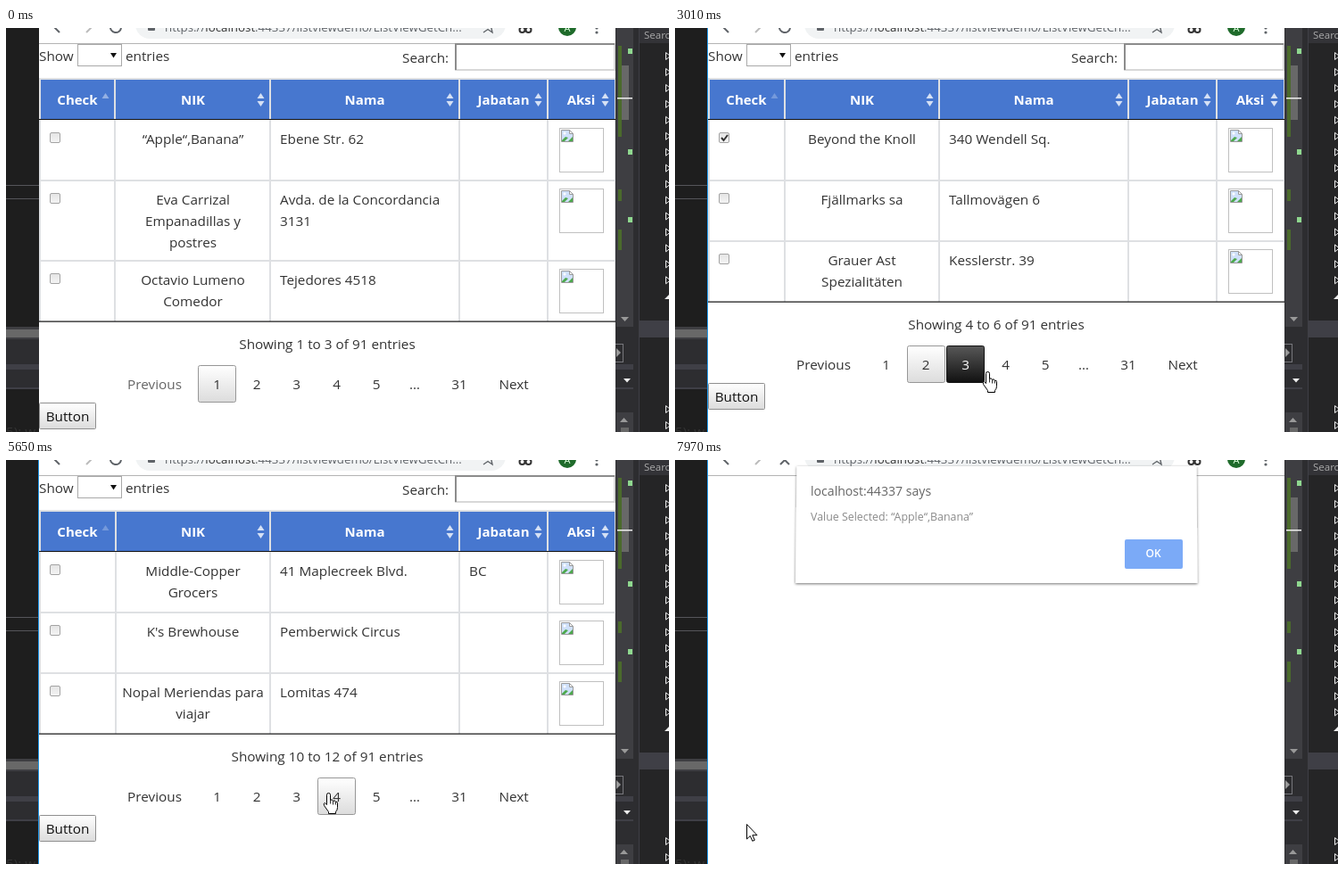
Recreate the animation shown at these times as an HTML page. Size 743 px wide and 453 px high, loop 8 s.

```html
<!DOCTYPE html>
<html lang="en">
<head>
<meta charset="utf-8">
<title>Paged table</title>
<style>
html, body { margin: 0; width: 100%; height: 100%; overflow: hidden; background: #1e1e1e; }
svg { display: block; }
text { font: 15.3px "Open Sans", "Noto Sans", sans-serif; fill: #333; white-space: pre; }
.mid { text-anchor: middle; }
.head { font-weight: 700; font-size: 15px; fill: #fff; }
</style>
</head>
<body>
<svg width="743" height="453" viewBox="0 0 743 453">
  <defs>
    <linearGradient id="light" x2="0" y2="1"><stop stop-color="#fff"/><stop offset="1" stop-color="#dcdcdc"/></linearGradient>
    <linearGradient id="hover" x2="0" y2="1"><stop stop-color="#585858"/><stop offset="1" stop-color="#111"/></linearGradient>
    <linearGradient id="down" x2="0" y2="1"><stop stop-color="#2b2b2b"/><stop offset="1" stop-color="#0c0c0c"/></linearGradient>
    <linearGradient id="box" x2="0" y2="1"><stop stop-color="#e4e4e4"/><stop offset="1" stop-color="#f4f4f4"/></linearGradient>
    <filter id="shade" x="-5%" y="-10%" width="110%" height="125%"><feDropShadow dx="0" dy="1" stdDeviation="1.6" flood-opacity=".55"/></filter>
  </defs>
  <g id="editor"></g>
  <g id="view"></g>
  <g id="cursor"></g>
</svg>
<script>
const $ = id => document.getElementById(id);
const rect = (x, y, w, h, fill, more = '') => `<rect x="${x}" y="${y}" width="${w}" height="${h}" fill="${fill}" ${more}/>`;
const path = (d, fill, more = '') => `<path d="${d}" fill="${fill}" ${more}/>`;
const line = (d, color, width = 1) => path(d, 'none', `stroke="${color}" stroke-width="${width}"`);
const text = (x, y, s, cls = '', style = '') => `<text x="${x}" y="${y}" class="${cls}" style="${style}">${s}</text>`;
const frame = (x, y, w, h, fill, stroke, r = 0) =>
  rect(x + .5, y + .5, w - 1, h - 1, fill, `stroke="${stroke}" rx="${r}"`);

// Each row: name lines, address lines, third column
const pages = [
  [['“Apple“,Banana”', 'Ebene Str. 62'],
   ['Eva Carrizal|Empanadillas y|postres', 'Avda. de la Concordancia|3131'],
   ['Octavio Lumeno|Comedor', 'Tejedores 4518']],
  [['Beyond the Knoll', '340 Wendell Sq.'],
   ['Fjällmarks sa', 'Tallmovägen 6'],
   ['Grauer Ast|Spezialitäten', 'Kesslerstr. 39']],
  [['Marnouddsl mère et|fille', '36, place Vélmar'],
   ['Vívido Cocina|preparada', 'C/ Oropín, 52'],
   ["Bel plat'", '15, rue des Plumières']],
  [['Middle-Copper|Grocers', '41 Maplecreek Blvd.', 'BC'],
   ["K's Brewhouse", 'Pemberwick Circus'],
   ['Nopal Meriendas para|viajar', 'Lomitas 474']]
];
const turns = [1860, 3470, 5570];            // page changes
const checks = [790, 2560, 4710, 6810];      // first box ticked on each page
const presses = [1780, 3390, 5490];          // pager button held for 80 ms
const pager = [['Previous', 166.5], ['1', 236.5], ['2', 281], ['3', 325.5], ['4', 370.5],
  ['5', 415], ['…', 458], ['31', 508], ['Next', 569]];

// time, x, y of the pointer tip
const moves = [[70, 150, 470], [500, 64, 142], [640, 54, 123], [940, 54, 123], [1100, 240, 294],
  [1280, 322, 393], [1450, 326, 396], [1700, 289, 396], [1860, 289, 396], [2160, 66, 127],
  [2330, 66, 127], [2390, 56, 124], [2600, 56, 124], [3010, 350, 385], [3160, 350, 385],
  [3240, 346, 385], [3500, 346, 385], [4100, 76, 127], [4250, 76, 127], [4330, 63, 125],
  [4480, 63, 125], [4560, 52, 125], [4850, 52, 125], [5030, 322, 342], [5270, 361, 373],
  [5680, 361, 373], [6110, 46, 129], [6340, 46, 129], [6500, 53, 126], [7000, 53, 126],
  [7560, 82, 404], [7820, 80, 408]];

const shapes = {
  arrow: path('M0 0V16.5L3.8 13 6.3 18.8 8.8 17.7 6.3 12.2H11.5Z', '#fff', 'stroke="#000"'),
  beam: line('M-3 -7H-1L0 -6 1 -7H3M0 -6V6M-3 7H-1L0 6 1 7H3', '#222', 1.2),
  hand: path('M-2 13V2Q-2 0 0 0T2 2V8Q4 6 5 9 7 7 8 10 10 9 10 11V16Q10 19 8 21V23H0V21L-5 14Q-6 11 -4 11Z',
    '#fff', 'stroke="#000"') + line('M2 8V12M5 9V13M8 10V13', '#000', .8)
};

function drawEditor() {
  const side = '#2d2d30', edge = '#3f3f46', grip = '#686868', pale = '#999';
  let s = rect(0, 176, 37, 1, '#55555a') + rect(0, 191, 37, 1, '#55555a') + rect(0, 335, 37, 14, '#3e3e42')
    + rect(0, 338, 37, 9, grip) + rect(0, 349, 37, 28, side) + rect(0, 377, 37, 6, edge)
    + rect(0, 383, 37, 20, side) + rect(0, 403, 37, 2, edge)
    + text(0, 458, '5): w', '', 'font:12px "DejaVu Sans Mono",monospace;fill:#ddd');
  s += rect(683, 0, 26, 453, side) + rect(684, 0, 19, 335, '#3e3e42') + rect(690, 42, 8, 61, grip);
  for (const [y, h] of [[20, 102], [181, 13], [226, 23]]) s += rect(686, y, 4, h, '#4b6a2c');
  for (const y of [23, 136, 212]) s += rect(697, y, 5, 6, '#8fd88f');
  s += rect(685, 78, 17, 1.5, '#eee') + path('M689 324h9l-4.500 5z', pale)
    + frame(676, 354, 16, 21, side, '#77777c') + path('M684 359v10l5-5z', pale)
    + rect(683, 377, 20, 6, edge) + path('M692 393h8l-4 4.500z', '#eee')
    + rect(683, 403, 20, 2, edge) + rect(684, 431, 19, 22, '#3e3e42')
    + path('M688 442h9l-4.500-5z', pale) + rect(689, 448, 9, 5, grip);
  s += rect(709, 0, 34, 453, '#252526') + rect(709, 0, 1, 453, edge) + rect(710, 0, 33, 17, '#333337')
    + text(715, 12, 'Search', '', 'font-size:11.500px;fill:#aaa') + rect(710, 328, 33, 19, edge);
  for (let i = 0; i < 15; i++) s += line(`M739.500 ${27.5 + i * 17.95}v8l5-4z`, '#eee');
  s += path('M738 304h6v-6z', '#eee');
  for (const y of [423.5, 441.5]) s += line(`M739.500 ${y}v8l5-4z`, '#eee');
  $('editor').innerHTML = s;
}

function toolbar(st) {
  const icon = '#5f6368';
  return rect(37, 0, 646, 453, '#fff') + (st.focus ? rect(36, 0, 1, 453, '#1d95e8') : '')
    + rect(145, -20, 415, 32, '#f1f3f4', 'rx="16"')
    + line('M60 5L54 -1', icon, 2) + line('M90 5L96 -1', '#bbb', 2)
    + (st.blank ? line('M118 5L128 -5M118 -5L128 5', icon, 2) : line('M117 -2A6 6 0 0 0 129 0', icon, 2))
    + rect(159, -5, 8, 8, icon, 'rx="1"')
    + text(178, 4, 'https://<tspan fill="#333">localhost</tspan>:44337/listviewdemo/ListViewGetCh...', '', `font-size:13.300px;fill:${icon}`)
    + line('M535 5L540 1.500 545 5 543.500 -2', icon, 1.4)
    + `<circle cx="578.500" cy="2" r="3" fill="none" stroke="#333" stroke-width="2"/><circle cx="585.500" cy="2" r="3" fill="none" stroke="#333" stroke-width="2"/>`
    + `<circle cx="629" cy="-1" r="10" fill="#1f6b2b"/>` + text(629, 4, 'A', 'mid', 'font-size:11px;fill:#dfd')
    + `<circle cx="662" cy="0" r="1.600" fill="${icon}"/><circle cx="662" cy="5" r="1.600" fill="${icon}"/>`
    + rect(37, 17, 646, 1, '#b4b4b4');
}

const checkbox = (y, on) => frame(49, y, 12, 12, 'url(#box)', '#a3a3a3', 1.5)
  + (on ? line(`M52 ${y + 6}l2.500 3 4.500-6`, '#333', 2) : '');

const brokenImage = y => frame(620, y, 50, 50, '#fff', '#c0c0c0')
  + path(`M622.500 ${y + 2.5}h9l4 4v9h-13z`, '#cfe0fa', 'stroke="#9a9a9a"')
  + path(`M623 ${y + 14}l4-4 3 1-4 4h-3z`, '#4ca84c') + path(`M630 ${y + 15}l5-5v5z`, '#4ca84c')
  + path(`M631.500 ${y + 2.5}v4h4z`, '#fff', 'stroke="#9a9a9a"')
  + `<circle cx="626" cy="${y + 6}" r="1.500" fill="#fff"/>`;

const lines = (x, y, s, cls) => s.split('|').map((part, i) => text(x, y + i * 24, part, cls)).join('');

function table(st) {
  const first = st.page === 0, grid = '#dee0e3';
  const tops = first ? [103, 171, 261, 329] : [103, 171, 239, 307];
  const cols = [first ? 122 : 123, 296, 508, 607], end = tops[3], dy = end - 329;
  let s = text(37, 37, 'Show') + frame(80, 18, 50, 25, '#fff', '#a9a9a9') + path('M117 28h7l-3.500 5.500z', '#111')
    + text(134, 37, 'entries') + text(444, 39, 'Search:')
    + rect(503, 17, 180, 31, '#d8d8d8') + rect(503, 17, 179, 2, '#8c8c8c') + rect(503, 17, 2, 30, '#8c8c8c')
    + rect(505, 19, 176, 27, '#fff');
  s += rect(37, 56, 646, end - 56, grid) + rect(39, 58, 643, 44, '#4777cf');
  tops.slice(0, 3).forEach((y, i) => { s += rect(39, y, 643, tops[i + 1] - y - (i < 2 ? 1 : 0), '#fff'); if (i) s += rect(39, y - 1, 643, 2, grid); });
  for (const x of cols) s += rect(x - 1, 58, 2, end - 58, grid);
  s += rect(37, 102, 646, 1, '#111') + rect(37, end - .5, 646, 1.2, '#111');
  ['Check', 'NIK', 'Nama', 'Jabatan', 'Aksi'].forEach((h, i) => {
    s += text([80, 209.5, 402, 557.5, 644.5][i], 86, h, 'mid head');
    const x = [111.5, 285.5, 497.5, 596.5, 671.5][i];
    s += path(`M${x - 4} 79h8l-4-6z`, '#fff', `opacity="${i ? .78 : first ? .42 : .25}"`);
    if (i) s += path(`M${x - 4} 82h8l-4 6z`, '#fff', 'opacity=".78"');
  });
  pages[st.page].forEach(([name, address, area = ''], i) => {
    const y = tops[i];
    s += checkbox(y + 14, st.checked && !i) + lines(209.5, y + 27, name, 'mid')
      + lines(307, y + 27, address, '') + text(519, y + 27, area) + brokenImage(y + 9);
  });
  const from = st.page * 3 + 1;
  s += text(360, 360 + dy, `Showing ${from} to ${from + 2} of 91 entries`, 'mid');
  pager.forEach(([label, x], i) => {
    const current = i === st.page + 1, hot = i === st.hover && !current;
    if (current || hot) s += frame(Math.round(x - 21.5), 378 + dy, 43, 42,
      `url(#${current ? 'light' : st.down ? 'down' : 'hover'})`, current ? '#979797' : '#111', 2);
    s += text(x, 405 + dy, label, 'mid', hot ? 'fill:#fff' : !i && first ? 'fill:#666' : '');
  });
  return s + frame(37, 420 + dy, 64, 30, st.press ? '#d4d4d4' : 'url(#light)', '#8f8f8f', 1)
    + text(69, 441 + dy, 'Button', 'mid', 'fill:#111');
}

const dialog = () => path('M136.500 7H584.500L585.500 138H135Z', '#fff', 'filter="url(#shade)"')
  + text(152, 40, 'localhost:44337 says', '', 'font-size:14.100px;fill:#666')
  + text(152, 68, 'Value Selected: “Apple“,Banana”', '', 'font-size:12.400px;fill:#8a8a8a')
  + rect(504, 89, 65, 33, '#7baaf7', 'rx="2"')
  + text(536, 109, 'OK', 'mid', 'font-size:12px;font-weight:600;fill:#fff');

function pointer(t) {
  const n = moves.findIndex(m => m[0] > t);
  if (n < 1) return moves[n ? moves.length - 1 : 0].slice(1);
  const [t0, x0, y0] = moves[n - 1], [t1, x1, y1] = moves[n];
  const k = (t - t0) / (t1 - t0), e = k * k * (3 - 2 * k);
  return [x0 + (x1 - x0) * e, y0 + (y1 - y0) * e];
}

let last = '';
function tick() {
  const t = performance.now() % 8000, [x, y] = pointer(t);
  const page = turns.filter(v => t >= v).length, top = page ? 356 : 378;
  const hover = y >= top && y < top + 42
    ? pager.findIndex(([, cx], i) => i > 0 && Math.abs(x - 4 - cx) < 21.5) : -1;
  const st = {
    page, hover, checked: t >= checks[page], focus: t >= 710,
    down: presses.some(p => t >= p && t < p + 80),
    press: t >= 7740, blank: t >= 7890, alert: t >= 7970
  };
  const key = JSON.stringify(st);
  if (key !== last) {
    $('view').innerHTML = toolbar(st) + (st.blank ? '' : table(st)) + (st.alert ? dialog() : '');
    last = key;
  }
  const kind = hover > 0 ? 'hand' : x > 130 && y < top ? 'beam' : 'arrow';
  if ($('cursor').dataset.kind !== kind) {
    $('cursor').dataset.kind = kind;
    $('cursor').innerHTML = shapes[kind];
  }
  $('cursor').setAttribute('transform', `translate(${Math.round(x) + .5} ${Math.round(y) + .5})`);
  requestAnimationFrame(tick);
}
drawEditor();
tick();
</script>
</body>
</html>
```
